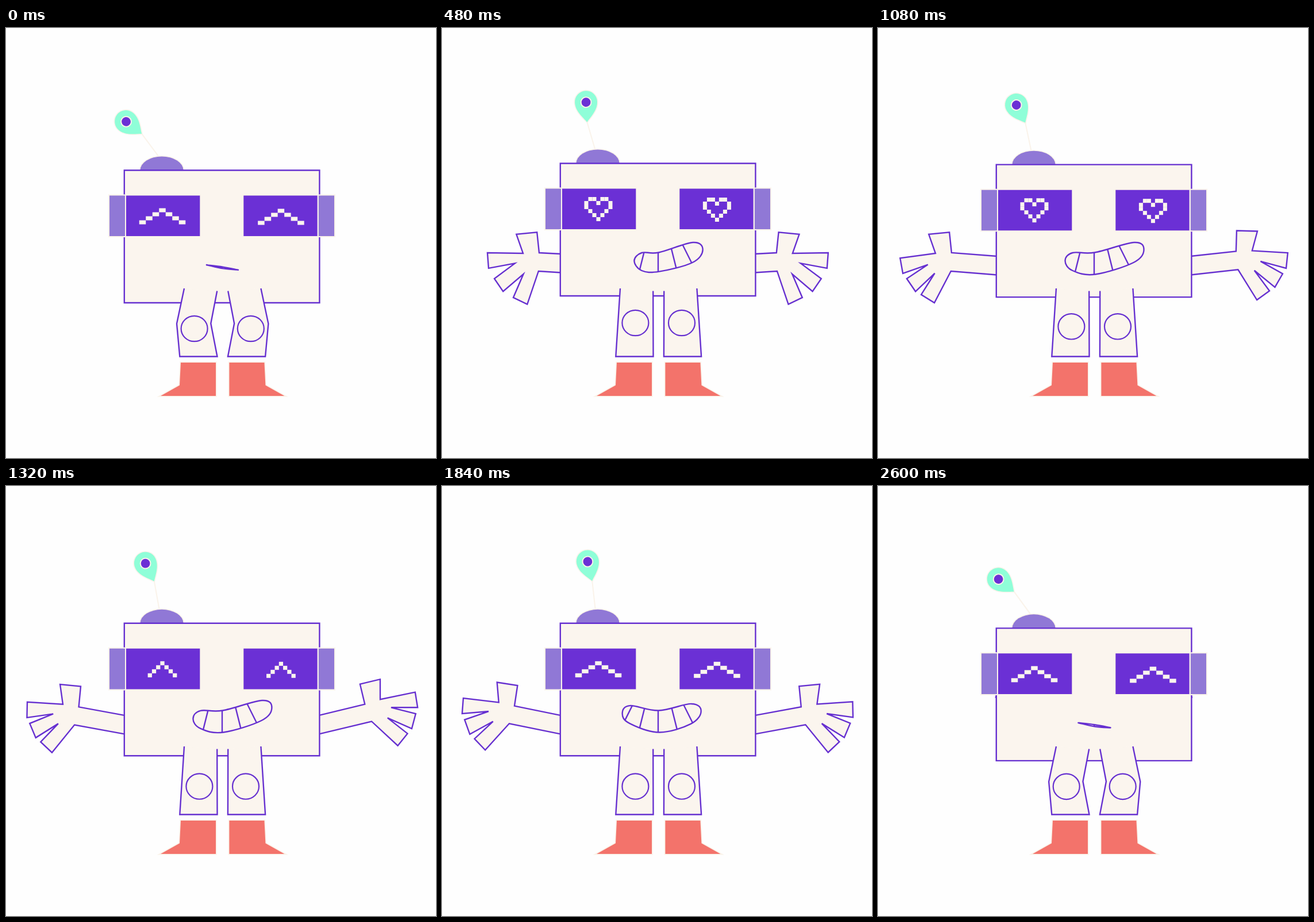
An HTML page with a canvas for the animation above (2.64 s loop, 748x748 px).

```html
<!DOCTYPE html>
<html lang="en">
<head>
<meta charset="utf-8">
<title>Robot</title>
<style>
html, body { margin: 0; width: 100%; height: 100%; overflow: hidden; background: #fefefe; }
canvas { display: block; width: 100vw; height: 100vh; }
</style>
</head>
<body>
<canvas id="stage"></canvas>
<script>
const SIZE = 748, LOOP = 2640, STEP = 40;
const INK = '#6630d0', SCREEN = '#6b30d5', CREAM = '#fbf5ee', EDGE = '#faf3ea';
const LILAC = '#9078d6', MINT = '#8ffed8', CORAL = '#f3736b';
const HEART = ['.##.##.', '#..#..#', '#.....#', '.#...#.', '..#.#..', '...#...'];
const canvas = document.getElementById('stage');
const ctx = canvas.getContext('2d');

const rad = deg => deg * Math.PI / 180;
const mix = (a, b, u) => a + (b - a) * u;
const clamp = u => Math.min(1, Math.max(0, u));
const part = (t, from, to) => clamp((t - from) / (to - from));
const ramp = (t, from, to) => { const u = part(t, from, to); return u * u * (3 - 2 * u); };
const pulse = (t, from, to) => Math.sin(Math.PI * part(t, from, to)) ** 2;

// Shared motion: standing up and down, a slow bob, and the fingers' early spread.
const rise = t => ramp(t, 0, 480) - ramp(t, 2080, LOOP);
const bob = t => Math.cos(Math.PI * 2 * (t - 480) / 2200);
const eager = t => 1 - ramp(t, 720, 1100);

function fill(color) { ctx.fillStyle = color; ctx.fill(); }
function stroke(color, width = 2.4) { ctx.strokeStyle = color; ctx.lineWidth = width; ctx.stroke(); }
function outlined(color) { fill(color); stroke(INK); }
function rimmed(color, width = 4) { stroke(EDGE, width); fill(color); }

function trace(points, close) {
  ctx.beginPath();
  points.forEach(([x, y]) => ctx.lineTo(x, y));
  if (close) ctx.closePath();
}

function rect(x, y, w, h) { ctx.beginPath(); ctx.rect(x, y, w, h); }
function circle(x, y, rx, ry = rx) { ctx.beginPath(); ctx.ellipse(x, y, rx, ry, 0, 0, Math.PI * 2); }

// Runs a drawing as is and again flipped, where sum = left x + right x.
function bothSides(sum, drawSide) {
  drawSide(0);
  ctx.save();
  ctx.translate(sum, 0);
  ctx.scale(-1, 1);
  drawSide(1);
  ctx.restore();
}

function drawArm(t, right) {
  const turn = (right ? 25 : 46) * pulse(t, 480, 1000) + 26 * pulse(t, right ? 920 : 1080, 2120) + 28 * (1 - rise(t));
  const early = eager(t) * rise(t);
  const reach = Math.min(305, 126 + 43 * Math.exp((480 - t) / 194));
  const x = mix(reach, 305, ramp(t, 2000, 2690)) + .64 * turn * early * part(t, 480, 560);
  const y = 391 - .58 * turn;
  const shoulder = 396.5 - 3.5 * bob(t) - .3 * turn * early;
  const root = Math.max(207, x + 36);
  const at = (angle, r) => [x + r * Math.cos(rad(angle + turn)), y + r * Math.sin(rad(angle + turn))];

  const gap = 24 + 6 * eager(t), width = 17;
  const points = [[root, shoulder], [x, y], at(264, 36), at(219, 51), at(178, 28)];
  for (let finger = -1; finger <= 1; finger++) {
    const a = 150 - finger * gap;
    points.push(at(a, 90), at(a - width, 92));
    if (finger < 1) points.push(at(a - (width + gap) / 2, 46));
  }
  points.push(at(92, 32), [root, shoulder + 32.5]);
  trace(points);
  outlined(CREAM);
}

function drawAntenna(t, top) {
  const up = rise(t), u = part(t, 480, 2120);
  const lean = rad(mix(-38, -17 + 12.5 * u, up));
  const tilt = mix(-52, -3 - 24 * Math.sin(Math.PI * u ** .8), up);
  const x = 267 + 50 * Math.sin(lean), y = top - 24 - 50 * Math.cos(lean);
  trace([[267, top - 22], [x, y]]);
  stroke(EDGE, 2);

  ctx.save();
  ctx.translate(x, y);
  ctx.rotate(rad(tilt));
  ctx.beginPath();
  ctx.moveTo(0, 0);
  ctx.bezierCurveTo(-7, -9, -19.5, -20, -19.5, -35);
  ctx.arc(0, -35, 19.5, Math.PI, 0);
  ctx.bezierCurveTo(19.5, -20, 7, -9, 0, 0);
  ctx.closePath();
  rimmed(MINT, 3);
  circle(0, -34.5, 7.9);
  rimmed(SCREEN);
  ctx.restore();

  ctx.beginPath();
  ctx.ellipse(271, top, 37.5, 24, 0, Math.PI, 0);
  rimmed(LILAC, 3);
}

function drawGlyph(x, y, t) {
  ctx.fillStyle = CREAM;
  // Hearts and carets swap hard; each caret then stretches sideways.
  const phase = (t - 280) % 640;
  if (t >= 280 && t < 1280 && phase < 360) {
    HEART.forEach((row, r) => [...row].forEach((dot, c) => {
      if (dot === '#') ctx.fillRect(x - 24.5 + c * 7, y + 58.5 + r * 7, 7, 7);
    }));
    return;
  }
  const grown = t < 280 ? 1 : t < 920 ? part(t, 640, 920) : part(t, 1280, 1560);
  const w = 7 + 4.5 * grown ** 1.5;
  for (let i = -3; i <= 3; i++) ctx.fillRect(x + (i - .5) * w, y + 66 + Math.abs(i) * 7, w, 7);
}

function drawHead(t, top) {
  rect(205.8, top, 339.6, 230.5);
  outlined(CREAM);
  for (const [ear, eye, glyph, drop] of [[180, 209, 272, 0], [543.7, 413.3, 478.4, 1]]) {
    rect(ear, top + 44, 27.3, 70.6);
    rimmed(LILAC);
    rect(eye, top + 44, 128.3, 70.6);
    rimmed(SCREEN);
    drawGlyph(glyph, top + drop, t);
  }
}

function drawMouth(t) {
  const up = rise(t), skew = 1 - ramp(t, 1280, 2120), grow = .85 + .15 * ramp(t, 300, 1080);
  const middle = mix(376.5, 378 + 16 * skew, up), half = mix(25.5, 68.5 * grow, up);
  const left = [middle - half, mix(412.5, 393 + 12 * skew, up)];
  const right = [middle + half, mix(420.5, 394 - 8 * skew, up)];
  const off = ([x, y], dx, dy) => [x + dx * up, y + dy * up];
  const points = [
    left, off(left, 13, -14), [377, mix(415.6, 390.5, up)], off(right, -17, -13),
    right, off(right, -18, 22), [378, mix(418.4, 390.5 + 38 * grow, up)], off(left, 13, 17)
  ];

  // Closed smooth curve through the points.
  const n = points.length, at = i => points[(i + n) % n];
  const handle = (i, dir) => [0, 1].map(k => at(i)[k] + dir * (at(i + 1)[k] - at(i - 1)[k]) / 5.6);
  ctx.save();
  ctx.beginPath();
  ctx.moveTo(...left);
  for (let i = 0; i < n; i++) ctx.bezierCurveTo(...handle(i, 1), ...handle(i + 1, -1), ...at(i + 1));
  ctx.closePath();
  outlined(CREAM);
  ctx.clip();
  for (let i = -2; i <= 2; i++) {
    trace([[376 + 20 * i, 372], [376 + 35 * i, 432]]);
    stroke(INK);
  }
  ctx.restore();
}

function drawLeg(t) {
  const up = rise(t), bend = 1 - up;
  trace([
    [310, 453], [306 - 9 * bend, 514.3], [302.3, 571.5],
    [367.5, 571.5], [367.3 - 11 * bend, 514], [367.2, 457.5]
  ]);
  outlined(CREAM);
  circle(327.6 + 8.8 * up, 523 - up * (4.5 + 5.5 * bob(t)), 23, 22.2);
  stroke(INK, 2.2);
  trace([[304, 582], [365, 582], [365, 640], [269, 640], [302, 621.5]], true);
  rimmed(CORAL, 3.4);
}

function draw(t) {
  const top = 247.5 - rise(t) * (10.1 + 1.9 * bob(t));
  ctx.fillStyle = '#fefefe';
  ctx.fillRect(0, 0, SIZE, SIZE);
  bothSides(750.8, right => drawArm(t, right));
  drawAntenna(t, top);
  drawHead(t, top);
  drawMouth(t);
  bothSides(753.4, () => drawLeg(t));
}

function resize() {
  const ratio = window.devicePixelRatio || 1;
  canvas.width = Math.round(innerWidth * ratio);
  canvas.height = Math.round(innerHeight * ratio);
  ctx.setTransform(canvas.width / SIZE, 0, 0, canvas.height / SIZE, 0, 0);
  ctx.miterLimit = 6;
}

const start = performance.now();
function tick(now) {
  const t = Math.max(0, now - start) % LOOP;
  draw(Math.floor(t / STEP) * STEP);
  requestAnimationFrame(tick);
}

addEventListener('resize', resize);
resize();
draw(0);
requestAnimationFrame(tick);
</script>
</body>
</html>
```
